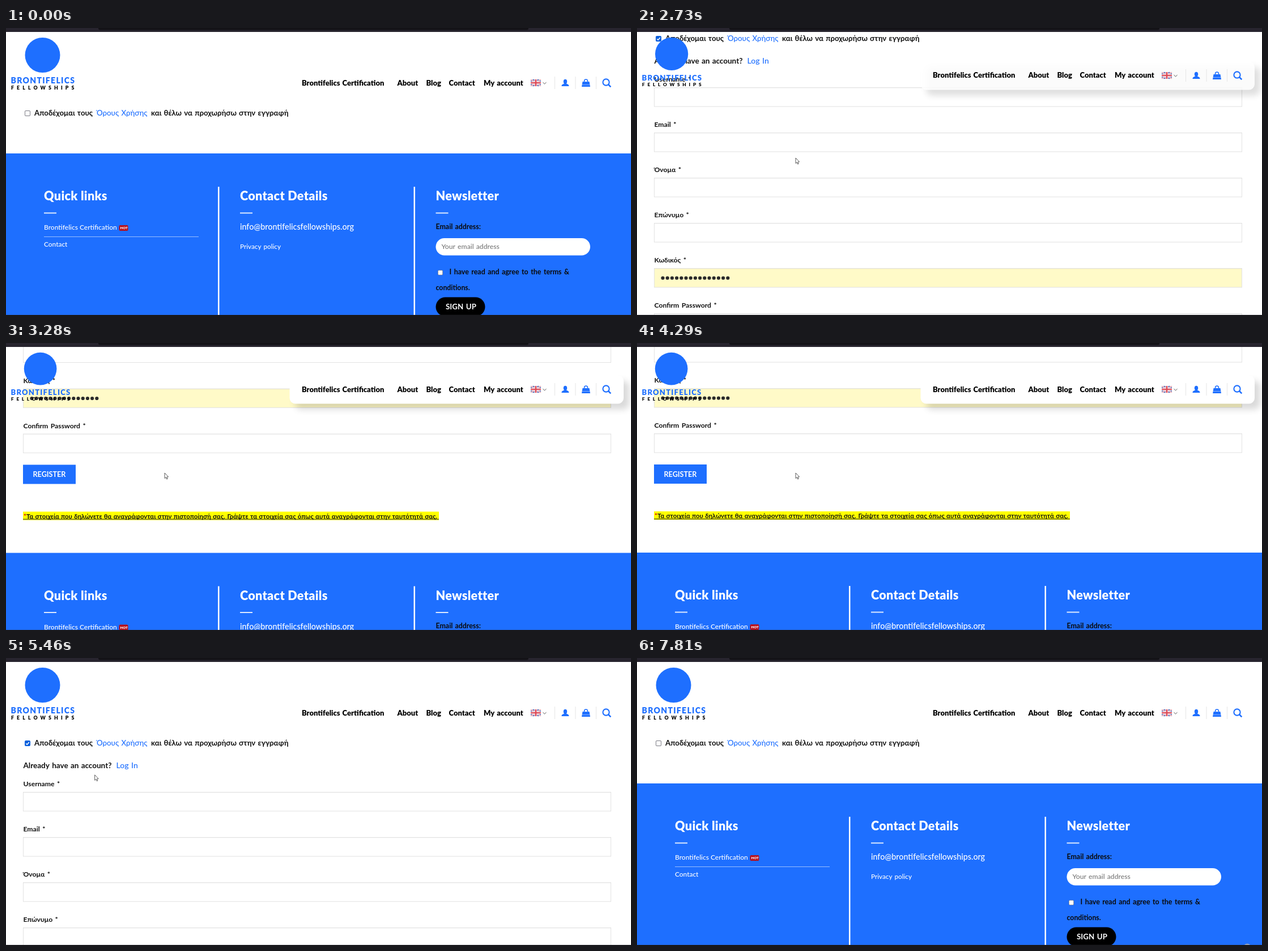
These frames come from a looping animation (1103 px wide and 508 px high, 7890 ms). An HTML page with a canvas:

```html
<!DOCTYPE html>
<html lang="en">
<head>
<meta charset="utf-8">
<title>Registration page</title>
<style>
  html, body { margin: 0; width: 100%; height: 100%; overflow: hidden; background: #fff; }
  canvas { display: block; width: 1103px; height: 508px; }
</style>
</head>
<body>
<canvas id="stage"></canvas>
<script>
const W = 1103, H = 508, LOOP = 7890;
const BLUE = '#1e6fff', FONT = 'Lato, "Open Sans", "Noto Sans", sans-serif';
const canvas = document.getElementById('stage');
const ctx = canvas.getContext('2d');
const dpr = window.devicePixelRatio || 1;
canvas.width = W * dpr;
canvas.height = H * dpr;

const OPEN_AT = 1630, CLOSE_AT = 6250;
const FOOTER_CLOSED = 222, FOOTER_OPEN = 848, MAX_SCROLL = 478;

// Pointer path: time, x, y
const POINTER = [
  [260, 992, 485], [600, 500, 330], [860, 150, 200], [1020, 55, 160],
  [1290, 38, 148], [1490, 38, 149], [1750, 38, 149], [2050, 180, 205],
  [2370, 280, 230], [4960, 280, 230], [5220, 225, 222], [5460, 157, 207],
  [5730, 55, 165], [5850, 42, 154], [6070, 38, 149], [6640, 38, 149],
  [6800, 230, 215], [7000, 760, 390], [7130, 1030, 506]
];

const clamp = v => Math.min(1, Math.max(0, v));
const lerp = (a, b, u) => a + (b - a) * u;
const span = (t, a, b) => clamp((t - a) / (b - a));
const smooth = u => u * u * (3 - 2 * u);
const easeOut = u => 1 - (1 - u) ** 3;

function text(str, x, y, size, weight, color, wordGap = 0, letterGap = 0) {
  ctx.font = `${weight} ${size}px ${FONT}`;
  ctx.wordSpacing = wordGap + 'px';
  ctx.letterSpacing = letterGap + 'px';
  ctx.fillStyle = color;
  ctx.fillText(str, x, y);
}

function rect(x, y, w, h, color) {
  ctx.fillStyle = color;
  ctx.fillRect(x, y, w, h);
}

function round(x, y, w, h, r, color) {
  ctx.beginPath();
  ctx.roundRect(x, y, w, h, r);
  ctx.fillStyle = color;
  ctx.fill();
}

function disc(x, y, r, color) {
  ctx.beginPath();
  ctx.arc(x, y, r, 0, Math.PI * 2);
  ctx.fillStyle = color;
  ctx.fill();
}

function line(points, color, width) {
  ctx.beginPath();
  points.forEach(([x, y], i) => i ? ctx.lineTo(x, y) : ctx.moveTo(x, y));
  ctx.strokeStyle = color;
  ctx.lineWidth = width;
  ctx.stroke();
}

function checkbox(x, y, checked, hover) {
  if (checked) {
    round(x, y, 10, 10, 2, hover ? '#054fb5' : '#0a60dc');
    line([[x + 2.3, y + 5.2], [x + 4.2, y + 7.2], [x + 7.8, y + 2.9]], '#fff', 1.5);
  } else {
    round(x, y, 10, 10, 2, hover ? '#55555f' : '#7b7b84');
    round(x + 1, y + 1, 8, 8, 1, '#fff');
  }
}

function field(label, y, filled) {
  text(label, 30.5, y, 12.2, 700, '#111', 1.5);
  rect(30, y + 10, 1038, 34.5, '#e2e2e2');
  rect(31, y + 11, 1036, 32.5, filled ? '#fffac8' : '#fff');
  rect(31, y + 11, 1036, 1, 'rgba(0,0,0,.03)');
  if (!filled) return;
  for (let i = 0; i < 15; i++) disc(45.5 + i * 8.2, y + 27.5, 3.1, '#2a2a2a');
}

function terms(checked, hover) {
  checkbox(33, 146, checked, hover);
  text('Αποδέχομαι τους', 50, 155, 13.2, 700, '#111', 1);
  text('Όρους Χρήσης', 160, 155, 13.3, 500, BLUE, 1);
  text('και θέλω να προχωρήσω στην εγγραφή', 256, 155, 13.2, 700, '#111', 1);
}

function form() {
  text('Already have an account?', 30.5, 195, 13.5, 700, '#111', 1);
  text('Log In', 194.5, 195, 14, 500, BLUE, 1);
  ['Username *', 'Email *', 'Όνομα *', 'Επώνυμο *', 'Κωδικός *', 'Confirm Password *']
    .forEach((label, i) => field(label, 227 + i * 80, i === 4));
  rect(30, 692, 93, 34, BLUE);
  text('REGISTER', 47.5, 713.5, 12.6, 700, '#fff');

  rect(30, 775, 734, 15, '#ff0');
  text('*', 31, 787, 11.4, 700, '#e00000');
  text('Τα στοιχεία που δηλώνετε θα αναγράφονται στην πιστοποίησή σας.', 36, 787, 11.3, 700, '#111', .5);
  text('Γράψτε τα στοιχεία σας όπως αυτά αναγράφονται στην ταυτότητά σας.', 390.5, 787, 11.4, 700, '#111', .5);
  rect(30, 788, 734, 1, '#222');
}

function footer(top) {
  ctx.save();
  ctx.translate(0, top);
  rect(0, 0, W, 700, BLUE);
  [['Quick links', 67], ['Contact Details', 413], ['Newsletter', 758.5]].forEach(([title, x]) => {
    text(title, x, 83, 21.6, 900, '#fff', 0, .3);
    rect(x, 104.5, 22, 2, 'rgba(255,255,255,.85)');
  });
  rect(374, 59, 2.5, 600, '#fff');
  rect(719.5, 59, 2.5, 600, '#fff');

  text('Brontifelics Certification', 67, 135, 12, 500, '#fff');
  round(199.5, 127, 16, 10, 2, '#b8101c');
  text('HOT', 201.5, 134.4, 6, 900, '#fff');
  rect(67, 147, 273, 1, 'rgba(255,255,255,.55)');
  text('Contact', 67, 164.5, 11.9, 500, '#fff');

  text('info@brontifelicsfellowships.org', 413, 135, 14.3, 500, '#fff');
  text('Privacy policy', 413, 168.5, 11.7, 500, '#fff', 1);

  text('Email address:', 758.5, 133.5, 12.4, 700, '#0a0a0a', 1);
  round(758.5, 150, 272.5, 30.5, 15.2, '#fff');
  text('Your email address', 768.5, 169, 12.2, 500, '#777', 1);
  round(762, 206.5, 9, 9, 2, '#7b7b84');
  round(762.8, 207.3, 7.4, 7.4, 1, '#fff');
  text('I have read and agree to the terms &', 782.5, 214, 12.4, 700, '#0a0a0a', 1.5);
  text('conditions.', 758.5, 242, 12.3, 700, '#0a0a0a');
  round(758.5, 254.5, 87, 34, 17, '#000');
  text('SIGN UP', 776, 276, 13.3, 700, '#fff', 1.5);
  ctx.restore();
}

function flag(x, y) {
  ctx.save();
  ctx.beginPath();
  ctx.rect(x, y, 18, 12);
  ctx.clip();
  rect(x, y, 18, 12, '#4c5fae');
  for (const [color, width] of [['#fff', 2.6], ['#e0707a', 1]]) {
    line([[x, y], [x + 18, y + 12]], color, width);
    line([[x, y + 12], [x + 18, y]], color, width);
  }
  rect(x + 6.5, y, 5, 12, '#fff');
  rect(x, y + 3.8, 18, 4.4, '#fff');
  rect(x + 7.6, y, 2.8, 12, '#dc4c59');
  rect(x, y + 4.8, 18, 2.4, '#dc4c59');
  ctx.restore();
}

function nav() {
  [['Brontifelics Certification', 522], ['About', 690.5], ['Blog', 741.5],
   ['Contact', 781.5], ['My account', 843]]
    .forEach(([label, x]) => text(label, x, 4.5, 13, 900, '#000', 1));
  flag(926, -6);
  line([[947.5, -.8], [950.5, 2], [953.5, -.8]], '#555', 1);
  for (const x of [968, 1004.5, 1041]) rect(x, -11, 1, 22, '#e6e6e6');

  // account
  ctx.fillStyle = BLUE;
  ctx.beginPath();
  ctx.ellipse(987, -2.2, 3.2, 4, 0, 0, Math.PI * 2);
  ctx.fill();
  ctx.beginPath();
  ctx.moveTo(980.5, 6);
  ctx.bezierCurveTo(980.5, 2.6, 983.5, 2.6, 985.5, 1);
  ctx.lineTo(988.5, 1);
  ctx.bezierCurveTo(990.5, 2.6, 993.5, 2.6, 993.5, 6);
  ctx.fill();

  // bag
  ctx.beginPath();
  ctx.moveTo(1017.5, -2);
  ctx.lineTo(1029.5, -2);
  ctx.lineTo(1031, 7);
  ctx.lineTo(1016, 7);
  ctx.fill();
  ctx.beginPath();
  ctx.arc(1023.5, -3, 3, Math.PI, 0);
  ctx.lineTo(1026.5, 0);
  ctx.moveTo(1020.5, -3);
  ctx.lineTo(1020.5, 0);
  ctx.strokeStyle = BLUE;
  ctx.lineWidth = 1.5;
  ctx.stroke();
  rect(1016.5, 3, 14, .8, 'rgba(255,255,255,.55)');

  // search
  ctx.beginPath();
  ctx.arc(1059, -1, 5.6, 0, Math.PI * 2);
  ctx.strokeStyle = BLUE;
  ctx.lineWidth = 2.1;
  ctx.stroke();
  line([[1063, 3], [1067.3, 7.3]], BLUE, 2.5);
}

function header(stuck) {
  const navY = lerp(97, 82, stuck);
  if (stuck > 0) {
    ctx.save();
    ctx.globalAlpha = stuck;
    ctx.shadowColor = 'rgba(0,0,0,.15)';
    ctx.shadowBlur = 12 * dpr;
    ctx.shadowOffsetX = ctx.shadowOffsetY = 10 * dpr;
    round(500.5, navY - 25, 589.5, 50.5, 10, '#fff');
    ctx.restore();
  }
  ctx.save();
  ctx.translate(0, navY);
  nav();
  ctx.restore();

  const size = lerp(1, .93, stuck);
  ctx.save();
  ctx.translate(9, 14);
  ctx.scale(size, size);
  disc(55.5, 34, 31, BLUE);
  text('BRONTIFELICS', -.5, 84, 14, 900, BLUE, 0, 1.3);
  text('FELLOWSHIPS', 0, 95, 8.8, 900, '#000', 0, 5.1);
  ctx.restore();
}

function pointerAt(t) {
  if (t < POINTER[0][0]) return null;
  const i = POINTER.findIndex(p => p[0] > t);
  if (i < 0) return null;
  const [t0, x0, y0] = POINTER[i - 1], [t1, x1, y1] = POINTER[i];
  const u = span(t, t0, t1);
  return [lerp(x0, x1, u), lerp(y0, y1, u)];
}

function pointer([x, y]) {
  const shape = [[0, 0], [0, 9.6], [2.2, 7.7], [3.7, 11], [5.2, 10.3], [3.8, 7.1], [6.6, 6.9]];
  ctx.beginPath();
  shape.forEach(([dx, dy]) => ctx.lineTo(x + dx, y + dy));
  ctx.closePath();
  ctx.fillStyle = '#fff';
  ctx.fill();
  ctx.strokeStyle = '#4a4a4a';
  ctx.lineWidth = .9;
  ctx.stroke();
}

function draw(t) {
  const open = t >= OPEN_AT && t < CLOSE_AT;
  const scroll = MAX_SCROLL * (smooth(span(t, 2425, 3310)) - smooth(span(t, 4275, 4965)));
  const stuck = t < 4000 ? easeOut(span(t, 2440, 3030)) : 1 - easeOut(span(t, 4900, 5150));
  const mouse = pointerAt(t);
  const hover = mouse && mouse[0] < 44 && scroll < 1;

  ctx.setTransform(dpr, 0, 0, dpr, 0, 0);
  rect(0, 0, W, H, '#fff');
  ctx.save();
  ctx.translate(0, -Math.round(scroll * 2) / 2);
  terms(open, hover);
  if (open) form();
  footer(open ? FOOTER_OPEN : FOOTER_CLOSED);
  ctx.restore();

  header(stuck);
  rect(0, 0, W, 7, '#27242e');
  round(163, -4, 759, 7.5, 3, '#131217');
  rect(0, 507, W, 1, 'rgba(50,50,60,.22)');
  if (mouse) pointer(mouse);
  if (t >= 7810) disc(1077, 512, 6.5, '#8d9cb8');
}

function tick() {
  draw(performance.now() % LOOP);
  requestAnimationFrame(tick);
}
tick();
</script>
</body>
</html>
```
